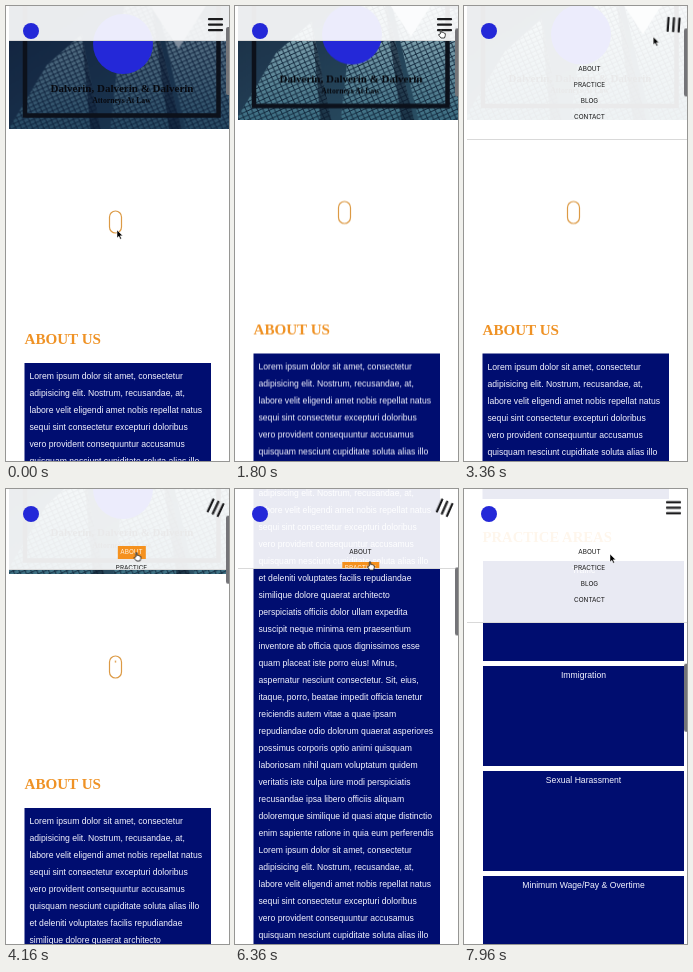
Write an HTML page that moves like this. It is 223x455 px and loops after 8000 ms.

```html
<!DOCTYPE html>
<html lang="en">
<head>
<meta charset="utf-8">
<title>Law firm mobile page</title>
<style>
  html, body { margin: 0; width: 100%; height: 100%; overflow: hidden; background: #fff; }
  body { position: relative; }
  svg, nav, #thumb, #logo { position: absolute; left: 0; top: 0; }
  svg { overflow: visible; }
  .serif { font-family: "Liberation Serif", serif; font-weight: bold; }
  .heading { fill: #ef9225; font-size: 15.1px; }
  .copy { font: 8.64px "Liberation Sans", sans-serif; fill: #f4f5ff; }
  .box { fill: #000d70; }
  nav {
    left: 3px; right: 0; height: 35px; box-sizing: border-box; overflow: hidden;
    background: rgba(255, 255, 255, .915); border-bottom: 1px solid #d9d9d9;
  }
  nav span {
    position: absolute; left: 122.5px; height: 13px; padding: 0 3px; transform: translateX(-50%);
    font: 6.4px/13px Inter, sans-serif; color: #171717;
  }
  #logo { left: 17px; top: 17px; width: 16px; height: 16px; border-radius: 50%; background: #2428d8; }
  #thumb { left: auto; right: 0; width: 3.5px; height: 68px; border-radius: 2px 0 0 2px; background: #747478; }
  #burger { transform-box: fill-box; transform-origin: center; }
</style>
</head>
<body>
<svg id="page" width="223" height="1600">
  <defs>
    <linearGradient id="sky" x2="1" y2="1">
      <stop stop-color="#18283e"/><stop offset="1" stop-color="#315d70"/>
    </linearGradient>
    <linearGradient id="glass" x2="0" y2="1">
      <stop stop-color="#a9c4cc"/><stop offset="1" stop-color="#31677b"/>
    </linearGradient>
    <pattern id="panes" width="5" height="4" patternUnits="userSpaceOnUse" patternTransform="rotate(-24)">
      <path d="M0 0H5M0 0V4" stroke="#10263a" stroke-width="1.6"/>
    </pattern>
    <clipPath id="heroClip"><path d="M3 0H223V123H3Z"/></clipPath>
  </defs>
  <g clip-path="url(#heroClip)">
    <g id="photo">
      <path d="M-20 -30H250V150H-20Z" fill="url(#sky)"/>
      <path id="towers" d="M0 130 48 50 82 20 104 130ZM108 130 124 -10 150 -10 184 130ZM188 130 158 0 235 10V130Z" fill="url(#glass)"/>
      <path d="M0 130 48 50 82 20 104 130ZM108 130 124 -10 150 -10 184 130ZM188 130 158 0 235 10V130Z" fill="url(#panes)"/>
      <path d="M148 -10H205L177 34Z" fill="#d9e5e8"/>
      <path d="M82 20 104 130H92ZM150 -10 184 130H170Z" fill="#0d1b2c" opacity=".65"/>
    </g>
    <path id="shade" d="M3 0H223V123H3Z" fill="#071538"/>
    <path d="M19 -5V109.5H212.500V-5" fill="none" stroke="#0c111b" stroke-width="4.500"/>
    <circle cx="117" cy="38" r="30" fill="#2428d8"/>
    <g class="serif" text-anchor="middle" fill="#080a10">
      <text x="116" y="85.500" font-size="11">Dalverin, Dalverin &amp; Dalverin</text>
      <text x="115.500" y="96.700" font-size="7.700">Attorneys At Law</text>
    </g>
  </g>
  <rect x="103.500" y="205" width="12" height="22" rx="6" fill="none" stroke="#dc9a45" stroke-width="1.200"/>
  <circle id="wheel" cx="109.500" cy="209" r=".9" fill="#dc9a45"/>
  <text class="serif heading" x="18.500" y="338">ABOUT US</text>
  <rect class="box" x="18.500" y="357" width="186.500" height="678"/>
  <g id="about" class="copy"></g>
  <text class="serif heading" x="18.500" y="1078" style="font-size:14.700px">PRACTICE AREAS</text>
  <g id="areas" class="copy" text-anchor="middle"></g>
</svg>

<nav id="nav"></nav>
<div id="logo"></div>
<svg width="223" height="36">
  <path id="burger" d="M203 13.200H216M203 18.700H216M203 24.200H216" stroke="#1b1b1d" stroke-width="2.200" stroke-linecap="round"/>
</svg>
<div id="thumb"></div>
<svg id="cursor" width="10" height="12">
  <path id="arrow" d="M0 0V8L1.900 6.300 3.200 9.200 4.500 8.600 3.200 5.800H5.700Z" fill="#000" stroke="#fff" stroke-width=".5"/>
  <path id="hand" d="M1.300 5V.9Q2 0 2.700.9V3.500Q3.500 3 4 3.800 4.800 3.300 5.300 4.200 6.400 3.900 6.300 5V6.500L5.500 9H2L-.4 6Q-.3 4.700.7 5.400Z" fill="#fff" stroke="#111" stroke-width=".8"/>
</svg>

<script>
const LOOP = 8000;
const SWING = 'cubic-bezier(.37,0,.63,1)';
const HOLD = 'steps(1,end)';
const $ = id => document.getElementById(id);
const start = document.timeline.currentTime || 0;

// Rows are [time, value, easing to the next row].
function play(el, prop, rows, duration = LOOP) {
  const all = [...rows];
  if (all[0][0] > 0) all.unshift([0, all[0][1]]);
  const last = all[all.length - 1];
  if (last[0] < duration) all.push([duration, last[1]]);
  const frames = all.map(([ms, value, easing = 'linear']) => ({ offset: ms / duration, [prop]: value, easing }));
  el.animate(frames, { duration, iterations: Infinity }).startTime = start;
}
const mapRows = (rows, fn) => rows.map(([ms, value, easing]) => [ms, fn(value), easing]);

// Values that jump to "on" during each [from, to] span.
function toggle(el, prop, spans, on, off) {
  play(el, prop, [[0, off, HOLD], ...spans.flatMap(([a, b]) => [[a, on, HOLD], [b, off, HOLD]])]);
}

function addText(parent, x, y, content) {
  const node = document.createElementNS('http://www.w3.org/2000/svg', 'text');
  node.setAttribute('x', x);
  node.setAttribute('y', y);
  node.textContent = content;
  parent.append(node);
}

const lines = `Lorem ipsum dolor sit amet, consectetur
adipisicing elit. Nostrum, recusandae, at,
labore velit eligendi amet nobis repellat natus
sequi sint consectetur excepturi doloribus
vero provident consequuntur accusamus
quisquam nesciunt cupiditate soluta alias illo
et deleniti voluptates facilis repudiandae
similique dolore quaerat architecto
perspiciatis officiis dolor ullam expedita
suscipit neque minima rem praesentium
inventore ab officia quos dignissimos esse
quam placeat iste porro eius! Minus,
aspernatur nesciunt consectetur. Sit, eius,
itaque, porro, beatae impedit officia tenetur
reiciendis autem vitae a quae ipsam
repudiandae odio dolorum quaerat asperiores
possimus corporis optio animi quisquam
laboriosam nihil quam voluptatum quidem
veritatis iste culpa iure modi perspiciatis
recusandae ipsa libero officiis aliquam
doloremque similique id quasi atque distinctio
enim sapiente ratione in quia eum perferendis`.split('\n');
for (let i = 0; i < 39; i++) addText($('about'), 23.5, 373 + i * 17, lines[i % lines.length]);

['Traffic', 'Immigration', 'Sexual Harassment', 'Minimum Wage/Pay & Overtime'].forEach((name, i) => {
  const y = 1097 + i * 105;
  const box = document.createElementNS('http://www.w3.org/2000/svg', 'rect');
  Object.entries({ class: 'box', x: 19, y, width: 201, height: 100 }).forEach(([k, v]) => box.setAttribute(k, v));
  $('areas').append(box);
  addText($('areas'), 119.5, y + 12, name);
});

const hovers = { ABOUT: [[3600, 4330]], PRACTICE: [[5750, 6370]], BLOG: [], CONTACT: [] };
Object.entries(hovers).forEach(([label, spans], i) => {
  const item = document.createElement('span');
  item.textContent = label;
  item.style.top = 57 + i * 16 + 'px';
  $('nav').append(item);
  toggle(item, 'backgroundColor', spans, '#f5911e', 'transparent');
  toggle(item, 'color', spans, '#fff3e0', '#171717');
});

const scroll = [
  [80, 0, SWING], [500, 9.5], [3993, 9.5, SWING], [4793, 285],
  [6170, 285, SWING], [6970, 1025]
];
play($('page'), 'transform', mapRows(scroll, s => `translateY(${-s}px)`));
play($('thumb'), 'transform', mapRows(scroll, s => `translateY(${21 + s * 0.15}px)`));

// Menu: [opens, closes]
const menu = [[2900, 3952], [5045, 6150], [7200, LOOP]];
const heights = [], angles = [];
for (const [open, close] of menu) {
  heights.push([open, 35, SWING], [open + 400, 134]);
  angles.push([open, 0, 'ease-in-out'], [Math.min(open + 900, 7900), 180]);
  if (close < LOOP) {
    heights.push([close, 134, SWING], [close + 400, 35]);
    angles.push([close, 180, 'ease-in-out'], [close + 500, 0]);
  }
}
play($('nav'), 'height', mapRows(heights, h => h + 'px'));
play($('burger'), 'transform', mapRows(angles, a => `rotate(${a}deg)`));

const pointer = [
  [250, [111, 224], SWING], [1000, [205, 23]], [1300, [204, 23]], [3200, [204, 23], SWING],
  [3750, [128.5, 63]], [4250, [128.5, 63], SWING], [4850, [207.5, 21]], [5400, [207.5, 21], SWING],
  [5900, [126, 77]], [6250, [126, 77], SWING], [6800, [199, 26]], [6950, [199, 26], SWING],
  [7130, [207, 20]], [7400, [207, 20], SWING], [7960, [146, 65]]
];
play($('cursor'), 'transform', mapRows(pointer, ([x, y]) => `translate(${x}px,${y}px)`));
const linkSpans = [[1200, 3360], [3600, 4330], [4700, 5550], [5750, 6370], [7070, 7520]];
toggle($('hand'), 'opacity', linkSpans, 1, 0);
toggle($('arrow'), 'opacity', linkSpans, 0, 1);

play($('photo'), 'transform', [[0, 'translate(-8px,8px) scale(1.02)'], [LOOP, 'translate(-14px,-8px) scale(1.14)']]);
play($('shade'), 'opacity', [[0, 0.42], [1000, 0.08], [2500, 0]]);
play($('wheel'), 'opacity', [[0, 0], [140, 1], [500, 0]], 2000);
play($('wheel'), 'transform', [[0, 'translateY(0)'], [500, 'translateY(5px)']], 2000);
</script>
</body>
</html>
```
